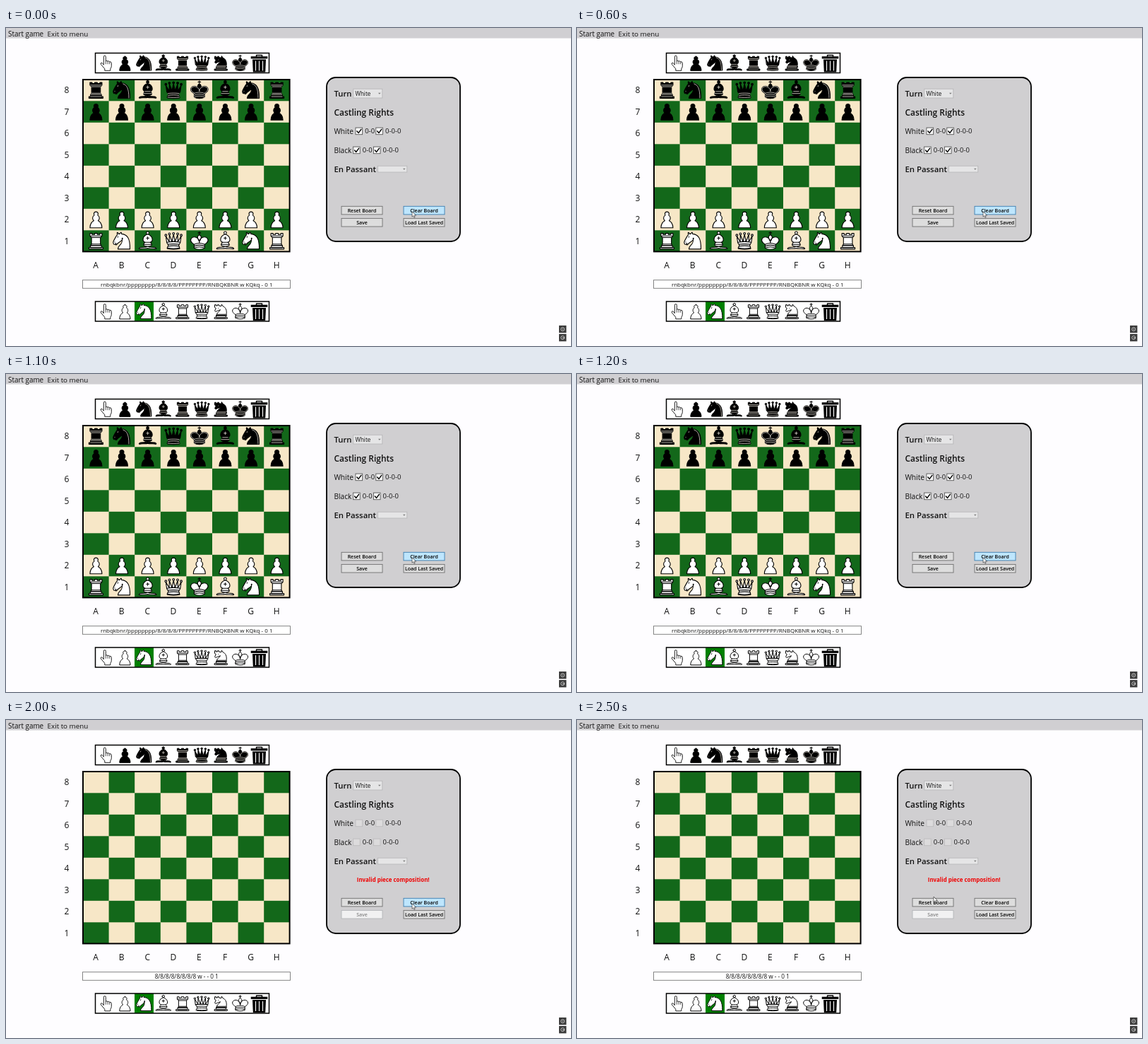
Recreate the animation shown at these times as an HTML page. Size 800 by 450 pixels, loop 2600 ms.

```html
<!DOCTYPE html>
<html lang="en">
<head>
<meta charset="utf-8">
<title>Board editor</title>
<style>
html, body { margin: 0; width: 100%; height: 100%; overflow: hidden; background: #fefdff; }
svg { display: block; width: 800px; height: 450px; }
text { font-family: "Open Sans", "Noto Sans", sans-serif; white-space: pre; }
</style>
</head>
<body>
<svg id="stage" viewBox="0 0 800 450" xmlns="http://www.w3.org/2000/svg"></svg>
<script>
const NS = "http://www.w3.org/2000/svg";
const LOOP = 2600, CLEAR = 1300, LEAVE = 2500;
const stage = document.getElementById("stage");

function add(tag, attrs, parent = stage) {
  const el = document.createElementNS(NS, tag);
  for (const k in attrs) el.setAttribute(k, attrs[k]);
  parent.appendChild(el);
  return el;
}
const group = (parent = stage) => add("g", {}, parent);
const rect = (x, y, width, height, fill, stroke = "none", parent = stage, sw = 1) =>
  add("rect", { x, y, width, height, fill, stroke, "stroke-width": sw }, parent);
const path = (d, fill, stroke = "none", parent = stage, sw = 1) =>
  add("path", { d, fill, stroke, "stroke-width": sw, "stroke-linejoin": "round", "stroke-linecap": "round" }, parent);

function text(str, x, y, size, { anchor = "start", weight = 400, fill = "#111", parent = stage } = {}) {
  const el = add("text", { x, y, "font-size": size, "text-anchor": anchor, "font-weight": weight, fill }, parent);
  el.textContent = str;
}

// Shapes on a 45 unit grid: [body, inner lines]
const dot = (x, y, r) => `M${x - r} ${y}a${r} ${r} 0 1 1 ${2 * r} 0a${r} ${r} 0 1 1 ${-2 * r} 0z`;
const crown = [[7.8, 12.5], [14.6, 10], [22.5, 9.3], [30.4, 10], [37.2, 12.5]].map(([x, y]) => dot(x, y, 1.8)).join("");
const SHAPES = {
  p: ["M22.5 9c-2.21 0-4 1.79-4 4 0 .89.29 1.71.78 2.38C17.33 16.5 16 18.59 16 21c0 2.03.94 3.84 2.41 5.03C15.41 27.09 11 31.58 11 39.5h23c0-7.92-4.41-12.41-7.41-13.47C28.06 24.84 29 23.03 29 21c0-2.41-1.33-4.5-3.28-5.62.49-.67.78-1.49.78-2.38 0-2.21-1.79-4-4-4z", ""],
  n: ["M22 10c10.5 1 16.5 8 16 29H15c0-9 10-6.5 8-21M24 18c.4 2.9-5.5 7.4-8 9-3 2-2.8 4.3-5 4-1-.9 1.4-3 0-3-1 0 .2 1.2-1 2-1 0-4 1-4-4 0-2 6-12 6-12s1.9-1.9 2-3.5c-.7-1-.5-2-.5-3 1-1 3 2.5 3 2.5h2s.8-2 2.5-3c1 0 1 3 1 3",
    "M9 25.5v.1M15.2 15l-.6 1.4"],
  b: ["M9 36c3.4-1 10.1.4 13.5-2 3.4 2.4 10.1 1 13.5 2 0 0 1.7.5 3 2-.7 1-1.7 1-3 .5-3.4-1-10.1.5-13.5-1-3.4 1.5-10.1 0-13.5 1-1.3.5-2.3.5-3-.5 1.3-1.9 3-2 3-2zM15 32c2.5 2.5 12.5 2.5 15 0 .5-1.5 0-2 0-2 0-2.5-2.5-4-2.5-4 5.5-1.5 6-11.5-5-15.5-11 4-10.5 14-5 15.5 0 0-2.5 1.5-2.5 4 0 0-.5.5 0 2z" + dot(22.5, 8, 2.5),
    "M17.5 26h10M15 30h15M22.5 15.5v5M20 18h5"],
  r: ["M9 39h27v-3H9zM12 36v-4h21v4zM11 14V9h4v2h5V9h5v2h5V9h4v5l-3 3v12.5l1.5 2.5h-20l1.5-2.5V17z",
    "M12 14h21M14 17h17M14 29.5h17M13 32h19M12.5 36h20"],
  q: ["M9.5 26c8-1.5 20-1.5 26 0L37.2 14.3 30.8 25l-.4-13.2-5 12.7-2.9-13.4-2.9 13.4-5-12.7L14.2 25 7.8 14.3zM9.5 26c0 2 1.5 2 2.3 4 1 1.5 1 1 .5 3.5-1.5 1-1.5 2.5-1.5 2.5-1.5 1.5.5 2.5.5 2.5 6.5 1 16 1 22.4 0 0 0 1.5-1 0-2.5 0 0 .5-1.5-1-2.5-.5-2.5-.5-2 .5-3.5 1-2 2.3-2 2.3-4-8-1.5-18-1.5-26 0z" + crown,
    "M11.8 30c3.5-1 18-1 21.4 0M12.3 33.5c6-1 15-1 20.4 0M11.5 37c6 1 16 1 22 0"],
  c: ["M9 39h27v-3H9zM12 36v-4h21v4zM9 14V9h3v2h3V9h3v2l5 1 1-4 2.5 4c6 2 9 9 7.5 17.5l1 2.5H12l1.5-2.5c.5-5 7-6 7.5-10-3 2-6 1.500-8 3.500-2 1.500-4 0-3.500-2l2-4z",
    "M13 32h19M12.5 36h20M14 29.5h19M17 16.2v.1"],
  k: ["M22.5 25s4.5-7.5 3-10.5c0 0-1-2.5-3-2.5s-3 2.5-3 2.5c-1.5 3 3 10.5 3 10.5M12.5 37c5.5 3.5 14.5 3.5 20 0v-7s9-4.5 6-10.5c-4-6.5-13.5-3.5-16 4V27v-3.5c-2.5-7.5-12-10.5-16-4-3 6 6 10.5 6 10.5z",
    "M12.5 30c5.5-3 14.5-3 20 0M12.5 33.5c5.5-3 14.5-3 20 0M12.5 37c5.5-3 14.5-3 20 0"]
};
const MANE = "M25 11.5c7 2 11 9 11 27";
const LOBES = "M32 29.5s8.5-4 6-9.700c-3.900-6-13.500-3-15.500 4v2.100-2.100c-2-7-11.600-10-15.500-4-2.500 5.700 6 9.700 6 9.700";

function piece(kind, black, cx, cy, scale, parent = stage) {
  const g = add("g", { transform: `translate(${cx} ${cy}) scale(${scale}) translate(-22.5 -24)` }, parent);
  const [body, lines] = SHAPES[kind];
  const line = black ? "#f4efe4" : "#000";
  if (kind === "k") path("M22.5 11.6V6M20 8h5", "none", "#000", g, 1.5);
  path(body, black ? "#000" : "#fff", "#000", g, 1.5);
  if (lines) path(lines, "none", line, g, black ? 1 : 1.4);
  if (black && kind === "n") path(MANE, "none", line, g, 1);
  if (black && kind === "k") path(LOBES, "none", line, g, 1);
}

function hand(cx, cy) {
  const g = add("g", { transform: `translate(${cx} ${cy})` });
  path("M-3 2V-9q0-1.7 1.5-1.7T0-9v6q1.5-1.2 2.8.3 1.6-.9 2.6.6Q8-2.3 8 0v4q0 2-1.5 4v2.5h-8V8L-7 1.5q-.8-1.6.6-2 1-.2 1.8.8z", "#fff", "#222", g, 1);
  path("M0-3v4M2.8-2.5V1M5.4-1.8V1", "none", "#222", g, .8);
}

function trash(cx, cy) {
  const g = add("g", { transform: `translate(${cx} ${cy})` });
  path("M-4-9.500v-2h8v2", "none", "#000", g, 1.5);
  rect(-11.8, -9.8, 23.6, 3.2, "#000", "none", g);
  path("M-9.500-5.600h19l-.8 18h-17.400z", "#000", "none", g);
  for (const x of [-5, 0, 5]) rect(x - .6, -3.5, 1.2, 14, "#fff", "none", g);
}

function palette(y, black) {
  rect(126.5, y, 246, 28, "#fff");
  if (!black) rect(182, y, 27, 28, "#008000");
  hand(141.3, y + 14.3);
  [..."pnbrqck"].forEach((k, i) => piece(k, black, 168.4 + i * 27.2, y + 14.6, .66));
  trash(358.5, y + 14.5);
  rect(126.5, y, 246, 28, "none", "#000", stage, 1.5);
}

const X0 = 109, Y0 = 72.8, SW = 36.6, SH = 30.5;
function board() {
  rect(X0, Y0, SW * 8, SH * 8, "#f7e7c7");
  for (let r = 0; r < 8; r++)
    for (let c = 1 - r % 2; c < 8; c += 2)
      rect(X0 + c * SW, Y0 + r * SH, SW, SH, "#13681a");
  rect(109, 73, 292.6, 243.4, "none", "#000", stage, 2);
  for (let i = 0; i < 8; i++) {
    text(8 - i, 86, Y0 + (i + .5) * SH + 4.4, 12, { anchor: "middle" });
    text("ABCDEFGH"[i], 127 + i * SW, 339.6, 12, { anchor: "middle" });
  }
}

function arrow(x, y) {
  path(`M${x - 1.8} ${y - .8}h3.6l-1.8 1.9z`, "#777");
}

function combo(x, y, w, h) {
  rect(x, y, w, h, "#e5e5e6", "#b4b4b6", stage, .8);
  arrow(x + w - 4, y + h / 2);
}

function check(x, y, on, parent) {
  rect(x, y, 9.6, 9.6, on ? "#fff" : "#dcdbdc", on ? "#555" : "#bdbcbe", parent, .9);
  if (on) path(`M${x + 2} ${y + 4.9}l2.2 2.4 3.7-5`, "none", "#000", parent, 1.5);
}

function button(label, x, y, parent = stage, fill = "#dddddd", line = "#707070", ink = "#000") {
  rect(x, y, 58, 11.6, fill, line, parent, .9);
  text(label, x + 29, y + 8.6, 7, { anchor: "middle", weight: 600, fill: ink, parent });
}

function pointer(x, y, parent) {
  path(`M${x} ${y}v7.2l1.7-1.5 1.2 2.6 1.2-.5-1.1-2.6h2.2z`, "#fff", "#222", parent, .6);
}

function gadget(y, d) {
  rect(783, y, 10.4, 10.4, "#3c3c3c");
  add("circle", { cx: 788.2, cy: y + 5.2, r: 2.5, fill: "none", stroke: "#ddd", "stroke-width": .8 });
  path(d, "none", "#ddd", stage, .9);
}

// Visible only from a to b within the loop
function during(el, a, b) {
  const frames = [{ offset: 0, opacity: a ? 0 : 1 }];
  if (a) frames.push({ offset: a / LOOP, opacity: 1 });
  if (b < LOOP) frames.push({ offset: b / LOOP, opacity: 0 });
  frames.push({ offset: 1, opacity: b < LOOP ? 0 : 1 });
  el.animate(frames.map(f => ({ ...f, easing: "step-end" })), { duration: LOOP, iterations: Infinity });
}

rect(0, 0, 800, 14.5, "#d0cfd2");
text("Start game", 3, 11.6, 9.9);
text("Exit to menu", 58.6, 11.6, 9.8);
palette(35.5, true);
board();
rect(108.5, 356.7, 294, 11.6, "#fff", "#777", stage, .9);
palette(387, false);

rect(454, 70, 189, 232, "#d0cfd1", "#000", stage, 1.8).setAttribute("rx", 13);
const bold = { weight: 600 };
text("Turn", 464.4, 97.4, 11.3, bold);
text("Castling Rights", 464.4, 124, 11.95, bold);
text("En Passant", 464.4, 204.4, 11.4, bold);
combo(491.8, 86.2, 41, 12.8);
text("White", 494.4, 95.8, 8.1);
combo(526.4, 195.2, 41.4, 8.8);
const ROWS = [["White", 495, 146], ["Black", 491.6, 173]];
for (const [name, x, y] of ROWS) {
  text(name, 464.4, y + 3.9, 10.2);
  text("0-0", x + 13.2, y + 3.2, 9.5);
  text("0-0-0", x + 42, y + 3.2, 9.5);
}
button("Reset Board", 475, 252.3);
button("Load Last Saved", 563, 269.4);
gadget(421, "M788.2 425.8v.8");
gadget(433, "M788.2 438.4h2.4");

const full = group(), empty = group(), hover = group(), away = group();

[..."rnbqkbnr"].forEach((k, c) => {
  const x = 127.4 + c * SW;
  [[k, true, 0], ["p", true, 1], ["p", false, 6], [k, false, 7]].forEach(([kind, black, row]) =>
    piece(kind, black, x, Y0 + (row + .5) * SH + .2, .74, full));
});
for (const [g, on, fen] of [
  [full, true, "rnbqkbnr/pppppppp/8/8/8/8/PPPPPPPP/RNBQKBNR w KQkq - 0 1"],
  [empty, false, "8/8/8/8/8/8/8/8 w - - 0 1"]
]) {
  text(fen, 255.7, 365.6, on ? 8 : 8.2, { anchor: "middle", parent: g });
  for (const [, x, y] of ROWS) {
    check(x, y - 4.9, on, g);
    check(x + 28.8, y - 4.9, on, g);
  }
}
button("Save", 475, 269.4, full);
button("Save", 475, 269.4, empty, "#f1f1f2", "#b3b6b9", "#858585");
text("Invalid piece composition!", 548.2, 229.4, 7.9, { anchor: "middle", weight: 700, fill: "#f00000", parent: empty });

button("Clear Board", 563, 252.3, hover, "#bee6fd", "#3c7fb1");
pointer(575, 260, hover);
button("Clear Board", 563, 252.3, away);
pointer(505, 250.4, away);

during(full, 0, CLEAR);
during(empty, CLEAR, LOOP);
during(hover, 0, LEAVE);
during(away, LEAVE, LOOP);
</script>
</body>
</html>
```
